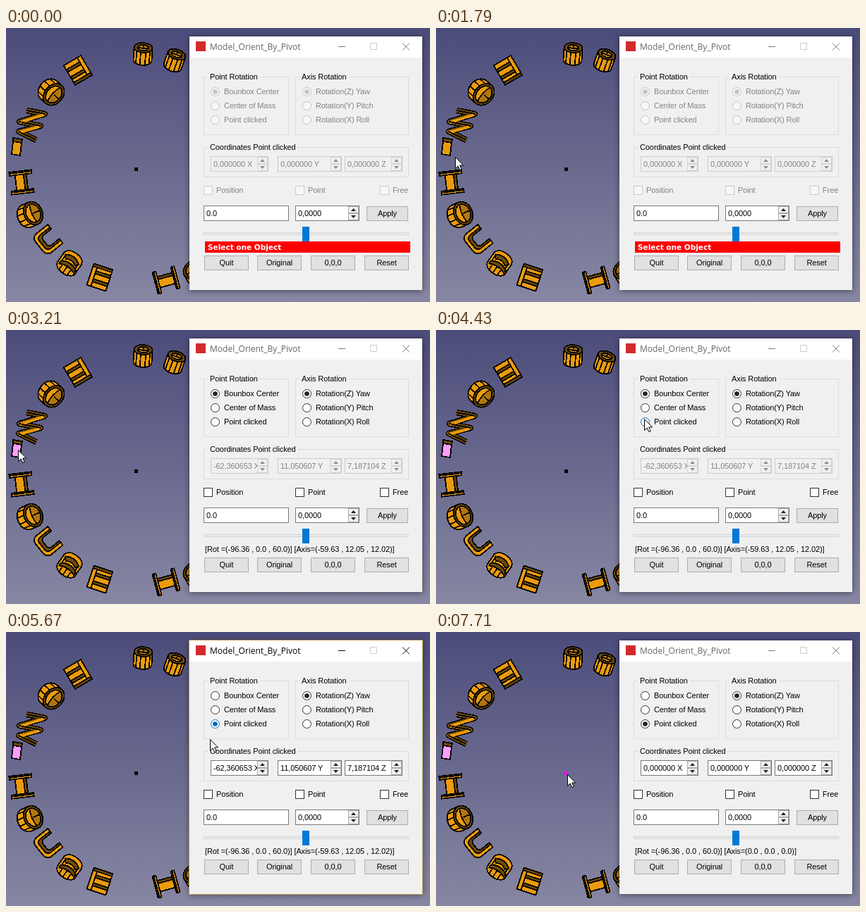
An HTML page that plays this animation: 601 px wide and 389 px high, repeating every 8 s.

```html
<!DOCTYPE html>
<html lang="en">
<head>
<meta charset="utf-8">
<title>Rotation dialog</title>
<style>
html, body { margin: 0; width: 100%; height: 100%; overflow: hidden; background: #68688f; }
#stage { display: block; width: 601px; height: 389px; }
text { font: 11px "Liberation Sans", Arial, sans-serif; letter-spacing: -.1px; white-space: pre; }
.title { font: 12px "Open Sans", "Noto Sans", sans-serif; letter-spacing: 0; }
.warn { font: bold 10.5px "DejaVu Sans", sans-serif; letter-spacing: 0; }
.mid { text-anchor: middle; }
.solid { stroke: #000; stroke-width: 1.8; stroke-linejoin: round; shape-rendering: crispEdges; }
.shadow { filter: drop-shadow(0 1px 4px rgba(0, 0, 0, .5)); }
</style>
</head>
<body>
<svg id="stage" viewBox="0 0 601 389">
  <defs>
    <linearGradient id="sky" x2="0" y2="1">
      <stop offset="0" stop-color="#4c4c7b"/>
      <stop offset="1" stop-color="#8787a3"/>
    </linearGradient>
  </defs>
  <rect width="601" height="389" fill="url(#sky)"/>
  <g id="letters" class="solid"></g>
  <g id="live"></g>
</svg>
<script>
const LOOP = 8000;
const ORANGE = '#eb9b0c', BROWN = '#6c4a0c', AMBER = '#b0760d';
const $ = id => document.getElementById(id);

// Basic shapes
const rect = (x, y, w, h, fill, stroke = 'none', more = '') =>
  `<rect x="${x}" y="${y}" width="${w}" height="${h}" fill="${fill}" stroke="${stroke}" ${more}/>`;
const box = (x, y, w, h, fill, stroke) => rect(x + .5, y + .5, w - 1, h - 1, fill, stroke);
const path = (d, fill = 'none', more = '') => `<path d="${d}" fill="${fill}" ${more}/>`;
const line = (d, color, width = 1) => path(d, 'none', `stroke="${color}" stroke-width="${width}"`);
const oval = (x, y, rx, ry, fill, more = '') =>
  `<ellipse cx="${x}" cy="${y}" rx="${rx}" ry="${ry}" fill="${fill}" ${more}/>`;
const text = (x, y, s, fill = '#000', cls = '') =>
  `<text x="${x}" y="${y + 4}" fill="${fill}" class="${cls}">${s}</text>`;

// Letters stand on a circle, feet pointing outward
const bar = (x, y, w, h, fill) => path(`M${x} ${y}h${w}v${h}h${-w}z`, fill);

function place(x, y, body) {
  const turn = Math.atan2(y - 200, x - 184) * 180 / Math.PI - 90;
  return `<g transform="translate(${x} ${y}) rotate(${turn.toFixed(1)})">${body}</g>`;
}

// Hollow barrel with ribs; hole is the inner share of the rim
function ring(rx, ry, h, hole, flip = 1) {
  const ribs = [-.75, -.3, .25, .7].map(k =>
    `M${k * rx} ${-h}V${h + ry * Math.sqrt(1 - k * k)}`).join('');
  const ix = rx * hole, iy = ry * hole;
  return `<g transform="scale(1 ${flip})">` +
    path(`M${-rx} ${-h}A${rx} ${ry} 0 0 1 ${rx} ${-h}V${h}A${rx} ${ry} 0 0 1 ${-rx} ${h}z`, ORANGE) +
    path(ribs) + oval(0, -h, rx, ry, BROWN) + oval(0, -h, ix, iy, AMBER) +
    path(`M${-ix} ${-h}A${ix} ${iy} 0 0 0 ${ix} ${-h}Q0 ${-h + iy * .4} ${-ix} ${-h}z`, ORANGE) +
    path(`M0 ${-h - iy}v${iy}`) + '</g>';
}

const letterH = () => bar(-11, -8, 22, 16, ORANGE) + bar(-11, -8, 22, 4, BROWN) +
  [-16, 11].map(x => bar(x, -16, 5, 32, ORANGE) + bar(x, -16, 2, 32, BROWN)).join('');

const letterE = () => bar(-14, -16, 28, 32, ORANGE) +
  [-7, 5].map(y => bar(-8, y, 22, 4, BROWN)).join('') +
  bar(-14, -16, 28, 4, BROWN) + path('M-8 -12V16');

const letterU = () =>
  path('M-17 -14V8Q-16 14 -9 15H9Q16 14 17 8V-14H12V5Q11 9 7 10H-7Q-11 9 -12 5V-14z', ORANGE) +
  path('M-12 -14V5Q-11 9 -7 10H7Q11 9 12 5V-14H9V1Q8 4 5 5H-5Q-8 4 -9 1V-14z', BROWN);

const letterS = () =>
  path('M-15 -9Q-12 -17 0 -17Q13 -17 15 -8V10Q10 17 0 17Q-12 17 -15 9z', ORANGE) +
  path('M-12 -7Q0 -15 12 -6L8 -2Q0 -7 -8 -2z', BROWN) +
  path('M-12 4Q0 -4 13 3V8Q0 2 -12 9z', BROWN) +
  path('M-7 8V16M0 6V17M7 7V16M-11 -8V5M11 -7V3');

const zigzag = 'M29 117L55 122L19 133L49 139L18 147L43 159';
const letterM = () =>
  path(zigzag, 'none', 'stroke-width="8.5"') +
  path(zigzag, 'none', `stroke-width="5.5" style="stroke:${BROWN}"`) +
  path('M54 123L20 134M48 140L19 148', 'none', `stroke-width="4" style="stroke:${ORANGE}"`) +
  path('M29 117L55 122M19 133L49 139M18 147L43 159');

$('letters').innerHTML = [
  [194, 37, ring(13, 7, 9, .6, -1)], [239, 46, ring(13, 7, 9, .6, -1)],
  [102, 60, letterE()], [64, 91, ring(17, 13, 5, .78)],
  [22, 219, letterH()], [34, 265, ring(17, 13, 5, .78)],
  [59, 301, letterU()], [90, 334, letterS()],
  [133, 354, letterE()], [227, 358, letterH()], [270, 347, ring(17, 13, 5, .78)]
].map(a => place(...a)).join('') + letterM();

// Steps: time, pointer x, pointer y, state changes
const steps = [
  [0, -40, -40, { face: ORANGE, dot: '#000', ready: 0, active: 0, pick: 0, hover: 0, fields: 0, data: 0, busy: 0 }],
  [200, 480, 374], [400, 424, 352], [600, 330, 310], [790, 226, 262], [990, 130, 224], [1190, 68, 204],
  [1390, 52, 198], [1590, 38, 190], [1790, 27, 183], [1990, 23, 178],
  [2190, 19, 173, { face: '#fff' }], [2410, 17, 170],
  [2610, 17, 170, { face: '#ff9cff', busy: 1 }],
  [2810, 17, 170, { busy: 2 }], [3010, 17, 170, { busy: 3 }],
  [3210, 17, 170, { busy: 0, ready: 1, data: 1 }],
  [3830, 62, 165], [4030, 165, 152], [4230, 262, 135],
  [4430, 295, 126, { hover: 1 }], [4630, 302, 128], [4850, 305, 131],
  [5050, 305, 131, { active: 1, pick: 2 }],
  [5250, 304, 134, { fields: 1 }], [5450, 300, 141], [5670, 289, 152],
  [5870, 250, 173, { hover: 0 }], [6070, 213, 192],
  [6270, 198, 199], [6470, 187, 203, { dot: '#fff' }], [6890, 186, 202],
  [7310, 186, 202, { dot: '#f0f', active: 0, busy: 1 }],
  [7510, 186, 202, { busy: 2 }],
  [7710, 186, 202, { busy: 0, data: 2 }]
];
const states = [];
for (const [, x, y, change] of steps) states.push({ ...states.at(-1), ...change, x, y });

const coords = [
  ['0,000000 X', '0,000000 Y', '0,000000 Z'],
  ['-62,360653 X', '11,050607 Y', '7,187104 Z'],
  ['0,000000 X', '0,000000 Y', '0,000000 Z']
];
const axes = ['', '-59.63 , 12.05 , 12.02', '0.0 , 0.0 , 0.0'];

// Dialog widgets
function group(x, y, w, h, label, gap) {
  return box(x, y, w, h, 'none', '#dcdcdc') + rect(x + 6, y - 1, gap, 3, '#f0f0f0') + text(x + 9, y, label);
}

function radio(x, y, label, on, ready, hot) {
  const ink = hot ? '#0078d7' : ready ? '#333' : '#c4c4c4';
  const fill = hot ? '#0067b5' : ready ? '#222' : '#c4c4c4';
  return oval(x + .5, y + .5, 6, 6, ready ? '#fff' : '#f7f7f7', `stroke="${ink}"`) +
    (on ? oval(x + .5, y + .5, 3.3, 3.3, fill) : '') +
    text(x + 13, y, label, ready ? '#000' : '#838383');
}

function check(x, label, ready) {
  return box(x, 224, 13, 13, ready ? '#fff' : '#f7f7f7', ready ? '#333' : '#ccc') +
    text(x + 18, 230, label, ready ? '#000' : '#838383');
}

function spin(x, y, w, value, on) {
  const edge = on ? '#7a7a7a' : '#cccccc', ink = on ? '#222' : '#8d8d8d';
  const rim = on ? '#acacac' : '#d4d4d4';
  const bx = x + w - 16, cx = bx + 7.5;
  return box(x, y, w, 22, on ? '#fff' : '#f0f0f0', edge) +
    `<svg x="${x + 2}" y="${y}" width="${w - 18}" height="22">${text(2, 11, value, on ? '#000' : '#838383')}</svg>` +
    box(bx, y + 1, 15, 10, '#f0f0f0', rim) + box(bx, y + 11, 15, 10, '#f0f0f0', rim) +
    path(`M${cx - 3.5} ${y + 8}h7l-3.5 -4zM${cx - 3.5} ${y + 14}h7l-3.5 4z`, ink);
}

function button(x, y, w, label) {
  return box(x, y, w, 21, '#e1e1e1', '#adadad') + text(x + w / 2, y + 10, label, '#000', 'mid');
}

function frame(s) {
  const ink = s.active ? '#000' : '#777';
  return rect(260, 12, 330, 360, '#f0f0f0', 'none', 'class="shadow"') +
    (s.active ? box(259, 11, 332, 362, '#f0f0f0', '#b39a55') : '') +
    rect(260, 12, 330, 30, '#fff') + rect(269, 19, 14, 14, '#d22b2b') +
    text(289, 27, 'Model_Orient_By_Pivot', s.active ? '#000' : '#666', 'title') +
    line('M471 26.5h10', ink) + line('M516.5 21.5h9v9h-9z', '#ccc') +
    line('M562 21.5l10 10m0 -10l-10 10', ink);
}

function status(s) {
  if (!s.ready) return rect(282, 303, 291, 16, '#f00') + text(286, 311, 'Select one Object', '#fff', 'warn');
  return text(282, 311, `[Rot =(-96.36 , 0.0 , 60.0)] [Axis=(${axes[s.data]})]`);
}

function dialog(s) {
  const [cx, cy, cz] = coords[s.data];
  const centers = ['Bounbox Center', 'Center of Mass', 'Point clicked'];
  const turns = ['Rotation(Z) Yaw', 'Rotation(Y) Pitch', 'Rotation(X) Roll'];
  return frame(s) +
    group(280, 69, 121, 83, 'Point Rotation', 72) +
    group(410, 69, 161, 83, 'Axis Rotation', 70) +
    group(280, 169, 291, 43, 'Coordinates Point clicked', 126) +
    centers.map((c, i) => radio(296, 90 + 20 * i, c, s.pick === i, s.ready, s.hover && i === 2)).join('') +
    turns.map((c, i) => radio(426, 90 + 20 * i, c, i === 0, s.ready)).join('') +
    spin(290, 182, 82, cx, s.fields) + spin(385, 182, 91, cy, s.fields) + spin(480, 182, 82, cz, s.fields) +
    check(280, 'Position', s.ready) + check(410, 'Point', s.ready) + check(530, 'Free', s.ready) +
    box(280, 252, 121, 22, '#fff', '#7a7a7a') + text(284, 263, '0.0') +
    spin(410, 252, 91, '0,0000', 1) + button(511, 253, 59, 'Apply') +
    box(280, 290, 291, 4, '#e7eaea', '#d6d6d6') + rect(420, 282, 10, 21, '#0078d7') +
    status(s) +
    ['Quit', 'Original', '0,0,0', 'Reset'].map((b, i) => button([281, 356, 432, 508][i], 323, 63, b)).join('');
}

function pointer(s) {
  const at = `transform="translate(${s.x} ${s.y}) rotate(${s.busy * 100})"`;
  if (s.busy) {
    return `<g ${at}>` + oval(0, 0, 9.5, 9.5, 'none', 'stroke="#1f7fc4" stroke-width="4.5"') +
      line('M0 -9.5A9.5 9.5 0 0 1 9.5 0', '#7cc8f2', 4) + '</g>';
  }
  return path('M.5 .5V16.5L4.2 13L6.8 18.6L9.2 17.6L6.7 12H11.6z', '#fff', `stroke="#000" ${at}`);
}

function view(s) {
  return '<g class="solid">' + path('M10 156L23 158L22 163L10 161z', BROWN) +
    path('M10 161L22 163L20 181L8 179z', s.face) + '</g>' +
    rect(182, 198, 5, 5, s.dot) + dialog(s) + pointer(s);
}

let shown = -1;
function tick() {
  const t = performance.now() % LOOP;
  const now = steps.findLastIndex(step => step[0] <= t);
  if (now !== shown) $('live').innerHTML = view(states[shown = now]);
  requestAnimationFrame(tick);
}
tick();
</script>
</body>
</html>
```
